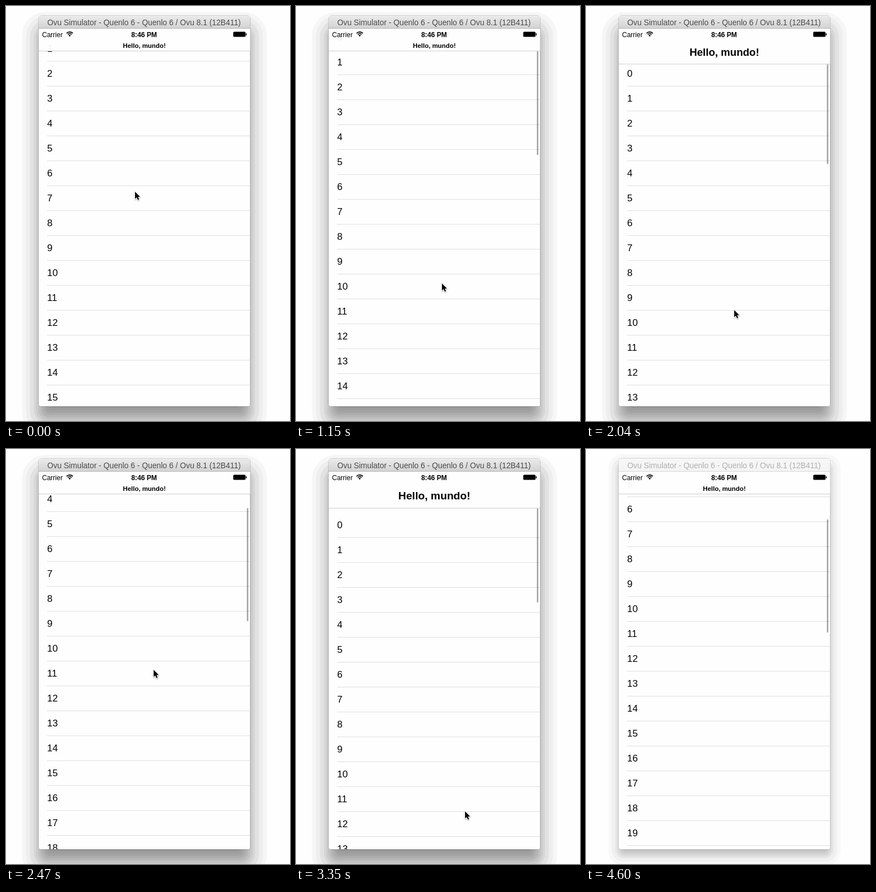
An HTML page with a canvas that plays this animation: 504 px wide and 733 px high, repeating every 4.7 s.

```html
<!DOCTYPE html>
<html lang="en">
<head>
<meta charset="utf-8">
<title>Flexible list header</title>
<style>
html, body { margin: 0; width: 100%; height: 100%; overflow: hidden; background: #fefefe; }
canvas { display: block; width: 504px; height: 733px; }
</style>
</head>
<body>
<canvas id="stage" width="504" height="733"></canvas>
<script>
const ctx = document.getElementById('stage').getContext('2d');
const LOOP = 4700, LAST_STEP = 52, BLUR_STEP = 51;
const WIN = { x: 58, y: 17, w: 375.5, h: 690 };
const ROW = 44, BAR_MIN = 79, BAR_MAX = 104;
const FONT = '"Liberation Sans", Arial, sans-serif';

// Ends of the swipes; each one starts fast and slows down.
const SWIPES = [
  { step: 0, top: 9, x: 229, y: 328 },
  { step: 7, top: -254, x: 219, y: 174 },
  { step: 18, top: 126, x: 272, y: 592 },
  { step: 23, top: 97, x: 263, y: 537 },
  { step: 27, top: -110, x: 262, y: 390 },
  { step: 32, top: -2, x: 266, y: 519 },
  { step: 37, top: 112, x: 300, y: 640 },
  { step: 44, top: -43, x: 348, y: 557 },
  { step: LAST_STEP, top: -180, x: 464, y: 715 }
];

// Playback runs in steps of 90 ms, with every sixth one 10 ms shorter.
function stepStart(k) {
  if (k === LAST_STEP) return 4600;
  return k * 90 - 10 * Math.floor((k + (k > 42 ? 5 : 0)) / 6);
}

function stepAt(time) {
  let k = LAST_STEP;
  while (k > 0 && stepStart(k) > time) k--;
  return k;
}

function poseAt(step) {
  const i = Math.max(1, SWIPES.findIndex(s => s.step >= step));
  const a = SWIPES[i - 1], b = SWIPES[i];
  const f = Math.sin(Math.PI / 2 * (step - a.step) / (b.step - a.step));
  const mix = key => Math.round(a[key] + (b[key] - a[key]) * f);
  return { top: mix('top'), x: mix('x'), y: mix('y') };
}

function roundRect(x, y, w, h, r) {
  ctx.beginPath();
  ctx.roundRect(x, y, w, h, r);
}

function text(str, x, y, size, color = '#000', align = 'left', weight = 'normal') {
  ctx.font = `${weight} ${size}px ${FONT}`;
  ctx.textAlign = align;
  ctx.fillStyle = color;
  ctx.fillText(str, x, y);
}

function hline(x, y, color) {
  ctx.fillStyle = color;
  ctx.fillRect(x, y, WIN.x + WIN.w - x, 1);
}

// Banded soft shadow: nested rounded boxes following a logistic falloff.
function shadow(active) {
  const { reach, dy, sigma, alpha } = active
    ? { reach: 29.5, dy: 23, sigma: 18, alpha: 0.46 }
    : { reach: 18, dy: 10, sigma: 11, alpha: 0.3 };
  const band = active ? 4 : 3;
  let d = reach;
  while (d > -reach) {
    const width = d > reach / 2 ? band + 3 : band;
    const mid = d - width / 2;
    const v = Math.round(255 * (1 - alpha / (1 + Math.exp(1.7 * mid / sigma))));
    ctx.fillStyle = `rgb(${v},${v},${v})`;
    roundRect(WIN.x - d, WIN.y + dy - d, WIN.w + 2 * d, WIN.h + 2 * d, Math.max(4, d * 0.8 + sigma));
    ctx.fill();
    d -= width;
  }
}

function titleBar(active) {
  const fill = ctx.createLinearGradient(0, 17, 0, 40);
  fill.addColorStop(0, active ? '#ebebeb' : '#f7f7f7');
  fill.addColorStop(1, active ? '#d2d2d2' : '#f4f4f4');
  ctx.fillStyle = fill;
  ctx.fillRect(WIN.x, WIN.y, WIN.w, 23);
  hline(WIN.x, 39, active ? '#b4b4b4' : '#d6d6d6');
  text('Ovu Simulator - Quenlo 6 - Quenlo 6 / Ovu 8.1 (12B411)', 245, 34, 13.8,
    active ? '#4c4c4c' : '#b0b0b0', 'center');
}

function list(top) {
  const first = Math.max(0, Math.floor((40 - top) / ROW));
  for (let n = first; top + n * ROW < 707; n++) {
    const y = top + n * ROW;
    text(n, 73, y + 28, 17);
    hline(73, y + ROW, '#e0e0e0');
  }
}

function scrollBar(top, bar) {
  const free = 85 - (top + 43) * 0.287;
  const start = Math.max(free, bar + 1);
  const end = free + 200 + 1.5 * (bar - BAR_MIN) - Math.max(0, top - 97) * 0.45;
  ctx.fillStyle = 'rgba(0,0,0,0.36)';
  roundRect(427.5, start, 2.5, end - start, 1.25);
  ctx.fill();
}

function wifi() {
  ctx.strokeStyle = ctx.fillStyle = '#000';
  ctx.lineWidth = 1.7;
  for (const r of [4.6, 7.7]) {
    ctx.beginPath();
    ctx.arc(113, 53.5, r, -Math.PI * 0.76, -Math.PI * 0.24);
    ctx.stroke();
  }
  ctx.beginPath();
  ctx.moveTo(113, 54);
  ctx.arc(113, 54, 2.8, -Math.PI * 0.76, -Math.PI * 0.24);
  ctx.fill();
}

function battery() {
  ctx.fillStyle = '#000';
  roundRect(403.3, 45.5, 21.7, 9, 1.5);
  ctx.fill();
  roundRect(425.6, 48, 1.6, 4, 0.8);
  ctx.fill();
}

function header(bar) {
  ctx.fillStyle = 'rgba(254,254,254,0.95)';
  ctx.fillRect(WIN.x, 40, WIN.w, bar - 40);
  hline(WIN.x, bar, '#cfcfcf');
  text('Carrier', 64, 54.5, 12);
  text('8:46 PM', 245, 54.5, 12.1, '#000', 'center', 'bold');
  wifi();
  battery();
  const open = (bar - BAR_MIN) / (BAR_MAX - BAR_MIN);
  const size = 11.4 + 7.8 * open;
  text('Hello, mundo!', 245.5, 69.5 + 12.5 * open + size * 0.36, size, '#000', 'center', 'bold');
}

function cursor(x, y) {
  const outline = [[0, 0], [0, 14], [3.2, 11], [5.6, 16.2], [8, 15.2], [5.7, 10.2], [10, 10]];
  ctx.save();
  ctx.translate(x, y);
  ctx.scale(0.9, 0.9);
  ctx.beginPath();
  outline.forEach(p => ctx.lineTo(...p));
  ctx.closePath();
  ctx.shadowColor = 'rgba(0,0,0,0.35)';
  ctx.shadowBlur = 2;
  ctx.shadowOffsetY = 1;
  ctx.strokeStyle = '#fff';
  ctx.lineWidth = 2;
  ctx.stroke();
  ctx.shadowColor = 'transparent';
  ctx.fillStyle = '#000';
  ctx.fill();
  ctx.restore();
}

function draw(step) {
  const { top, x, y } = poseAt(step);
  const active = step < BLUR_STEP;
  const bar = Math.round(Math.min(BAR_MAX, Math.max(BAR_MIN, BAR_MAX - 0.35 * (BAR_MAX - top))));

  ctx.fillStyle = '#fefefe';
  ctx.fillRect(0, 0, 504, 733);
  shadow(active);
  roundRect(WIN.x, WIN.y, WIN.w, WIN.h, [5, 5, 4, 4]);
  ctx.strokeStyle = active ? 'rgba(0,0,0,0.28)' : 'rgba(0,0,0,0.2)';
  ctx.lineWidth = 1;
  ctx.stroke();

  ctx.save();
  ctx.clip();
  ctx.fillStyle = '#fefefe';
  ctx.fillRect(WIN.x, WIN.y, WIN.w, WIN.h);
  list(top);
  if (step > 0) scrollBar(top, bar);
  header(bar);
  titleBar(active);
  ctx.restore();

  if (active) cursor(x, y);
}

const start = performance.now();
function tick() {
  draw(stepAt((performance.now() - start) % LOOP));
  requestAnimationFrame(tick);
}
tick();
</script>
</body>
</html>
```
